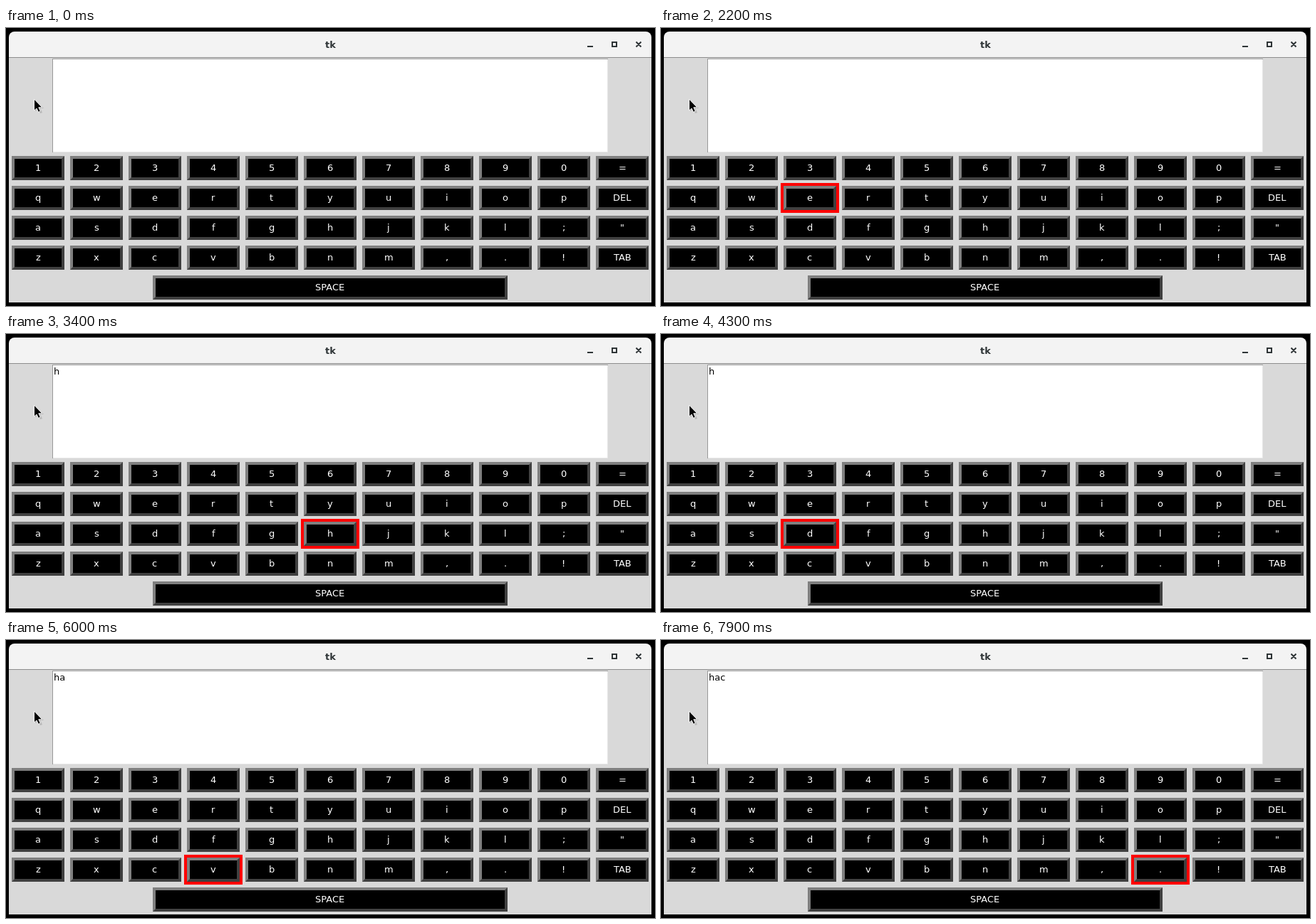
An HTML page for the animation above (8 s loop, 911x391 px).

```html
<!DOCTYPE html>
<html>
<head>
<meta charset="utf-8">
<style>
html, body { margin: 0; width: 911px; height: 391px; overflow: hidden; background: #000; }
svg { display: block; }
text { font: 13px "DejaVu Sans", sans-serif; white-space: pre; }
.title { font-weight: bold; fill: #2e3436; }
</style>
</head>
<body>
<svg id="stage" width="911" height="391" viewBox="0 0 911 391">
  <path d="M4 42V13a8 8 0 0 1 8-8H898a8 8 0 0 1 8 8V42Z" fill="#f3f3f3"/>
  <path d="M4 41H906V42H4Z" fill="#8c8c8c"/>
  <path d="M4 42H906V386H4Z" fill="#d9d9d9"/>
  <text class="title" x="448" y="28">tk</text>
  <g fill="none" stroke="#2e3436" stroke-width="2">
    <path d="M816 26H824M851 20H857V26H851ZM884.5 19.5L891.5 26.5M891.5 19.5L884.5 26.5"/>
  </g>
  <path d="M65 43H845V175H65Z" fill="#e6e6e6"/>
  <path d="M65 43H845V44H66V175H65Z" fill="#999"/>
  <path d="M66 44H844V174H66Z" fill="#fff"/>
  <text id="typed" x="67" y="57"></text>
  <g id="keys"></g>
  <rect id="focus" width="78" height="38" fill="none" stroke="#f00" stroke-width="4"/>
  <path d="M41 102V117L45 114L48 120L51 119L48 113H53Z" fill="#000" opacity=".15"/>
  <path d="M39.5 100V116L43 113L45.5 118.3L48.2 117L45.8 111.7H50.7Z" fill="#000" stroke="#fff" stroke-width=".9"/>
</svg>
<script>
const ROWS = ['1 2 3 4 5 6 7 8 9 0 =', 'q w e r t y u i o p DEL', 'a s d f g h j k l ; "', 'z x c v b n m , . ! TAB']
  .map(row => row.split(' '));
const KEY_W = 82, KEY_H = 42, LEFT = 4, TOP = 176, LOOP = 8000;

// [time, key that takes the focus]
const MOVES = [
  [1400, '1'], [1800, 'q'], [2200, 'e'], [2400, 'r'], [2600, 't'], [2900, 'y'], [3100, 'h'],
  [3800, 'g'], [4000, 'f'], [4300, 'd'], [4500, 's'], [4600, 'a'],
  [5400, 'z'], [5600, 'x'], [5900, 'c'], [6000, 'v'], [6400, 'c'],
  [7000, 'x'], [7200, 'z'], [7500, 'TAB'], [7700, '!'], [7900, '.']
];
const TYPING = [[3400, 'h'], [5000, 'ha'], [6700, 'hac']];

const keys = document.getElementById('keys');
const focusBox = document.getElementById('focus');
const typed = document.getElementById('typed');

function add(tag, attrs) {
  const node = document.createElementNS('http://www.w3.org/2000/svg', tag);
  for (const name in attrs) node.setAttribute(name, attrs[name]);
  return keys.appendChild(node);
}

function drawKey(label, left, top, width) {
  const x = left + 4, y = top + 4, w = width - 8, h = KEY_H - 8;
  add('rect', { x, y, width: w, height: h, fill: '#404040' });
  add('path', { d: `M${x} ${y}h${w}l-4 4L${x + 4} ${y + h - 4}l-4 4Z`, fill: '#7f7f7f' });
  add('rect', { x: x + 4, y: y + 4, width: w - 8, height: h - 8, fill: '#000' });
  const text = add('text', { y: top + 25, fill: '#fff' });
  text.textContent = label;
  text.setAttribute('x', Math.round(left + width / 2 - text.getComputedTextLength() / 2));
}

const spots = {};
ROWS.forEach((row, r) => row.forEach((label, c) => {
  const x = LEFT + c * KEY_W, y = TOP + r * KEY_H;
  spots[label] = [x, y];
  drawKey(label, x, y, KEY_W);
}));
drawKey('SPACE', 202, TOP + 4 * KEY_H, 506);

const latest = (steps, t) => steps.reduce((value, [time, next]) => t >= time ? next : value, '');

function render() {
  const t = performance.now() % LOOP;
  const key = latest(MOVES, t);
  focusBox.style.display = key ? '' : 'none';
  if (key) {
    focusBox.setAttribute('x', spots[key][0] + 2);
    focusBox.setAttribute('y', spots[key][1] + 2);
  }
  typed.textContent = latest(TYPING, t);
  requestAnimationFrame(render);
}
render();
</script>
</body>
</html>
```
